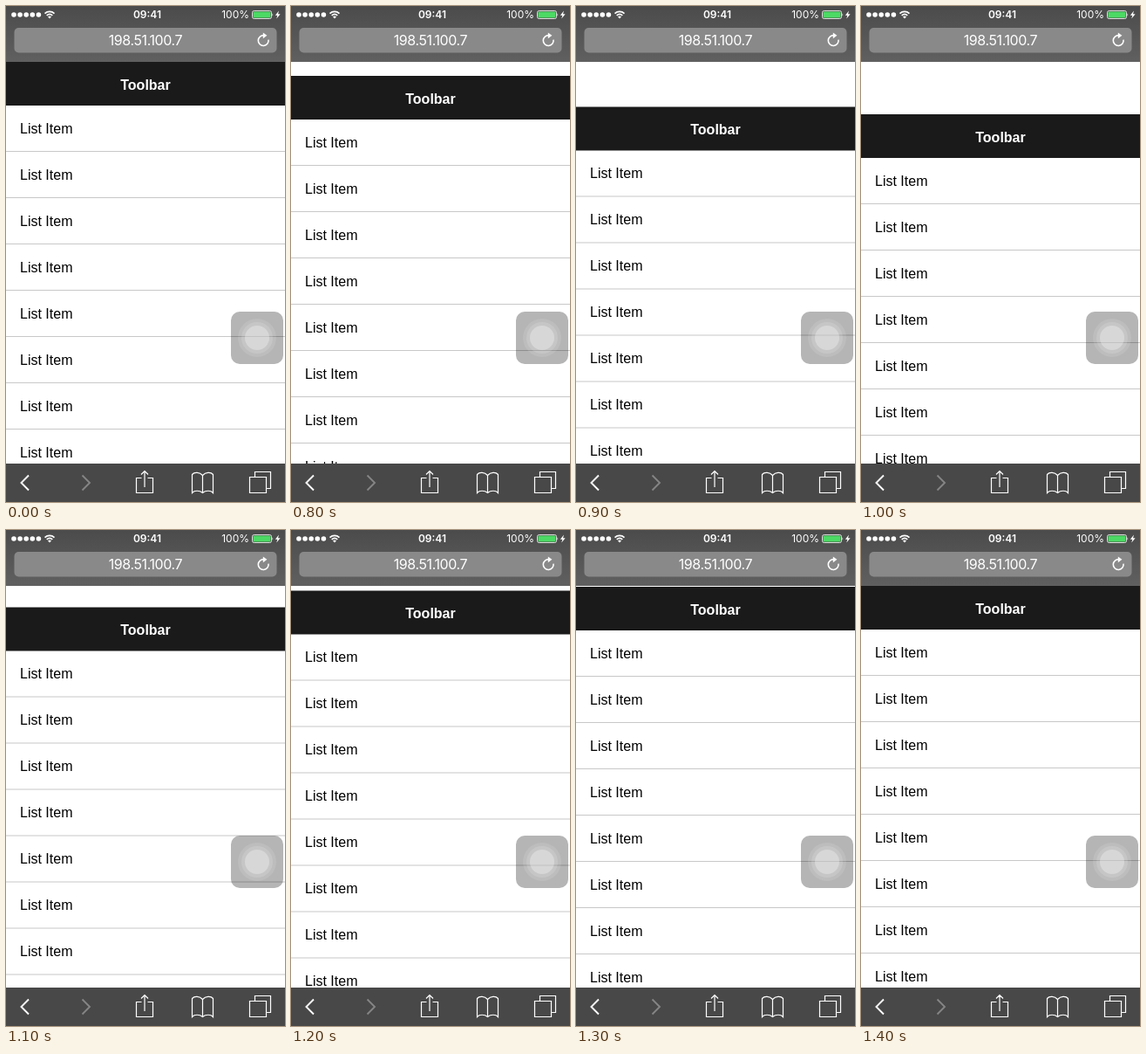
An HTML page for the animation above (2 s loop, 320 px wide and 568 px high).

```html
<!DOCTYPE html>
<html lang="en">
<head>
<meta charset="utf-8">
<title>Overscroll bounce</title>
<style>
  html, body { margin: 0; width: 100%; height: 100%; overflow: hidden; background: #fff; }
  svg { display: block; }
  text { font: 16px "Liberation Sans", Arial, sans-serif; }
  .bold { font-weight: bold; }
  .ui { font: 12px Inter, sans-serif; fill: #fff; }
  .icon { fill: none; stroke: #fff; stroke-width: 1.2; }
</style>
</head>
<body>
<svg width="320" height="568" viewBox="0 0 320 568">
  <defs>
    <linearGradient id="chrome" x2="0" y2="1">
      <stop stop-color="#4b4b4b"/>
      <stop offset="1" stop-color="#606060"/>
    </linearGradient>
  </defs>

  <g id="shapes">
    <rect y="64" width="320" height="50" fill="#1a1a1a"/>
  </g>
  <g id="labels">
    <text class="bold" x="160" y="96" text-anchor="middle" fill="#fff">Toolbar</text>
  </g>

  <g id="assist" transform="translate(288 380)">
    <rect x="-30" y="-30" width="60" height="60" rx="10" fill="#000" opacity=".29"/>
    <g fill="#fff">
      <circle r="22" opacity=".1"/>
      <circle r="18" opacity=".14"/>
      <circle r="14" opacity=".3"/>
    </g>
  </g>

  <g id="top-bar">
    <rect width="320" height="64" fill="url(#chrome)"/>
    <rect x="9.5" y="25" width="301" height="28.5" rx="5" fill="#898989"/>
    <path d="M9 10h.01M16.1 10h.01M23.2 10h.01M30.3 10h.01M37.4 10h.01"
          stroke="#fff" stroke-width="5.6" stroke-linecap="round"/>
    <g class="icon" stroke-width="1.6" style="stroke-width:1.6">
      <path d="M44.5 8.6a8 8 0 0 1 11 0M46.7 10.9a5 5 0 0 1 6.6 0"/>
      <path d="M48 12.3a3 3 0 0 1 4 0L50 14.4Z" fill="#fff" stroke="none"/>
      <path d="M296 33.7A5.9 5.9 0 1 0 301 38.6"/>
      <path d="M294.8 30.4L299.4 33.8L294.8 37.2Z" fill="#fff" stroke="none"/>
    </g>
    <text class="ui" x="162" y="14.3" text-anchor="middle" style="font-weight:600">09:41</text>
    <text class="ui" x="279" y="14.3" text-anchor="end">100%</text>
    <text class="ui" x="160" y="45" text-anchor="middle" style="font-size:16px;letter-spacing:-.4px">198.51.100.7</text>
    <rect x="282.5" y="5.5" width="22" height="9" rx="2" class="icon" style="stroke-width:.8"/>
    <rect x="283.5" y="6.5" width="20" height="7" rx="1" fill="#4cd964"/>
    <path d="M305.5 8.3q1.5 1.7 0 3.4ZM313 5.5L308.8 10.8H311.3L310.3 14.5L314.6 9.2H312Z" fill="#fff"/>
  </g>

  <g id="bottom-bar">
    <rect y="524" width="320" height="44" fill="#484848"/>
    <g class="icon">
      <path d="M26 537.5L17.5 546L26 554.5" style="stroke-width:1.9"/>
      <path d="M87.5 537.5L96 546L87.5 554.5" style="stroke-width:1.9;stroke:#858585"/>
      <path d="M155.5 540.5H149.5V557.5H168.500V540.5H162.5M159 551V532.500M155 536.500L159 532.500L163 536.500"/>
      <path d="M225.500 537.500C222 533.500 216 533.500 213.500 536.500V557.500C216 554.500 222 554.500 225.500 557.500C229 554.500 235 554.500 237.500 557.500V536.500C235 533.500 229 533.500 225.500 537.500V557.500"/>
      <path d="M279.500 539.500H298.500V557.500H279.500ZM285.500 539.500V533.500H303.500V552.500H298.500"/>
    </g>
  </g>
</svg>
<script>
  const LOOP = 2000, STEP = 100, PULL_START = 800, RELEASE = 1000;
  const ROW = 53, LIST_TOP = 114, PEAK = 60;
  const shapes = document.getElementById('shapes');
  const labels = document.getElementById('labels');

  function add(parent, tag, attrs, text = '') {
    const el = document.createElementNS('http://www.w3.org/2000/svg', tag);
    for (const name in attrs) el.setAttribute(name, attrs[name]);
    el.textContent = text;
    parent.append(el);
  }

  for (let i = 0; i < 8; i++) {
    const y = LIST_TOP + i * ROW;
    add(shapes, 'rect', { y: y + ROW - 1, width: 320, height: 1, fill: '#c8c8c8' });
    add(labels, 'text', { x: 16, y: y + 32 }, 'List Item');
  }

  // Finger pull, then a critically damped spring back, in half pixels.
  function pullAt(time) {
    const t = Math.floor(time / STEP) * STEP;
    if (t < PULL_START) return 0;
    if (t < RELEASE) return t < PULL_START + STEP ? 16 : 51.5;
    const u = (t - RELEASE) / 50;
    return Math.round(2 * PEAK * (1 + u) * Math.exp(-u)) / 2;
  }

  function draw() {
    const pull = pullAt(performance.now() % LOOP);
    shapes.setAttribute('transform', `translate(0 ${pull})`);
    labels.setAttribute('transform', `translate(0 ${Math.floor(pull)})`);
    requestAnimationFrame(draw);
  }
  draw();
</script>
</body>
</html>
```
